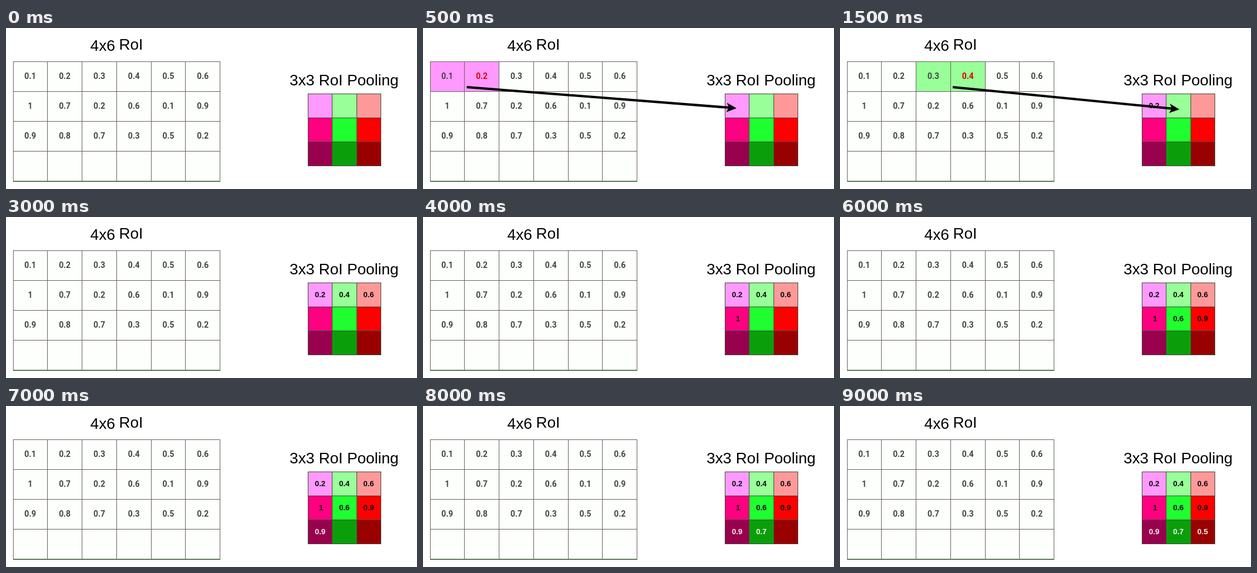
Write an HTML page that moves like this. It is 700 px wide and 275 px high and loops after 10000 ms.

```html
<!DOCTYPE html>
<html lang="en">
<head>
<meta charset="utf-8">
<title>RoI pooling</title>
<style>
  html, body { margin: 0; width: 100%; height: 100%; overflow: hidden; background: #fff; }
  svg { display: block; width: 700px; height: 275px; }
  text { font-family: "Liberation Sans", Arial, sans-serif; }
  .title { font-size: 26.3px; }
  .cell { font: bold 13.8px Roboto, sans-serif; text-anchor: middle; }
  .pooled { font-size: 13px; font-weight: bold; text-anchor: middle; }
</style>
</head>
<body>
<svg id="stage" viewBox="0 0 700 275"></svg>
<script>
const LOOP = 10000, STEP = 1000, INK = '#424642';
const values = [
  [0.1, 0.2, 0.3, 0.4, 0.5, 0.6],
  [1, 0.7, 0.2, 0.6, 0.1, 0.9],
  [0.9, 0.8, 0.7, 0.3, 0.5, 0.2],
];
const colors = [
  '#ff99ff', '#99ff99', '#ff9999',
  '#ff0080', '#1fff30', '#ff0000',
  '#99004d', '#0a9f0a', '#990000',
];
const maxInk = ['#e00000', '#e00000', '#e00000', '#fff', '#e00000', '#fff', '#fff', '#fff', '#fff'];
const tips = [
  [534, 137], [578, 139], [618, 141.5],
  [535, 179.5], [575, 183.5], [617, 183.5],
  [536, 220], [575, 219], [617, 220],
];
const stage = document.getElementById('stage');

function add(tag, attrs, content) {
  const el = document.createElementNS('http://www.w3.org/2000/svg', tag);
  for (const key in attrs) el.setAttribute(key, attrs[key]);
  if (content !== undefined) el.textContent = content;
  return stage.appendChild(el);
}

function lines(xs, ys, stroke) {
  const d = xs.map(x => `M${x} ${ys[0]}V${ys[ys.length - 1]}`)
    .concat(ys.map(y => `M${xs[0]} ${y}H${xs[xs.length - 1]}`)).join('');
  add('path', { d, stroke, fill: 'none', 'stroke-linecap': 'square' });
}

const gridX = [12.5, 70.5, 129.5, 188.5, 247.5, 305.5, 364.5];
const gridY = [57.5, 108.5, 159.5, 210.5, 261.5];
const poolX = [514.5, 555.5, 597.5, 638.5];
const poolY = [112.5, 153.5, 194.5, 235.5];

add('rect', { width: 700, height: 275, fill: '#fff' });
add('rect', { x: 12, y: 57, width: 353, height: 205, fill: '#fdfffd' });
const mark = add('rect', { height: 51 });
lines(gridX, gridY, '#6c6565');
add('path', { d: 'M12 262H365', stroke: '#3f703f', 'stroke-width': 1.5 });

const cells = values.map((row, r) => row.map((v, c) =>
  add('text', { class: 'cell', x: 41.3 + 58.8 * c, y: 87.3 + 51 * r, fill: INK }, v)));

[['4x6', 143.5, 39], ['RoI', 192.5, 37], ['3x3 RoI Pooling', 483, 98]].forEach(
  ([s, x, y]) => add('text', { class: 'title', x, y }, s));

colors.forEach((fill, k) => {
  const c = k % 3, r = Math.floor(k / 3);
  add('rect', {
    x: poolX[c], y: poolY[r], fill,
    width: poolX[c + 1] - poolX[c], height: poolY[r + 1] - poolY[r],
  });
});
lines(poolX, poolY, '#454a40');

const pooled = colors.map((_, k) => {
  const c = k % 3, r = Math.floor(k / 3);
  const v = Math.max(...values[r].slice(2 * c, 2 * c + 2));
  return add('text', {
    class: 'pooled', x: 535 + 41.3 * c + (v === 1 ? 1.5 : 0), y: 137 + 41 * r,
    fill: r === 2 ? '#f5eeee' : '#0b0b0b',
  }, v);
});

const shaft = add('path', { stroke: '#000', 'stroke-width': 4, fill: 'none' });
const head = add('path', { d: 'M0 0L-17 8L-13 0L-17 -8Z' });

function drawArrow(c, r, [x, y]) {
  const x0 = 192 + 117.5 * (c - 1), y0 = 101 + 51 * r;
  const angle = Math.atan2(y - y0, x - x0);
  shaft.setAttribute('d',
    `M${x0} ${y0}L${x - 12 * Math.cos(angle)} ${y - 12 * Math.sin(angle)}`);
  head.setAttribute('transform', `translate(${x} ${y}) rotate(${angle * 180 / Math.PI})`);
}

let shown = -1;
function render(time) {
  const beat = Math.floor(time % LOOP / (STEP / 2));
  if (beat === shown) return;
  shown = beat;
  const k = beat >> 1;
  const active = beat % 2 === 1 && k < 9;
  const c = k % 3, r = Math.floor(k / 3);

  pooled.forEach((el, i) => el.setAttribute('visibility', i < k ? 'visible' : 'hidden'));
  cells.flat().forEach(el => el.setAttribute('fill', INK));
  for (const el of [mark, shaft, head]) el.setAttribute('visibility', active ? 'visible' : 'hidden');
  if (!active) return;

  const x = gridX[2 * c], pair = values[r].slice(2 * c, 2 * c + 2);
  mark.setAttribute('x', x);
  mark.setAttribute('y', gridY[r]);
  mark.setAttribute('width', gridX[2 * c + 2] - x);
  mark.setAttribute('fill', colors[k]);
  cells[r][2 * c + pair.indexOf(Math.max(...pair))].setAttribute('fill', maxInk[k]);
  drawArrow(c, r, tips[k]);
}

const start = performance.now();
function tick() {
  render(performance.now() - start);
  requestAnimationFrame(tick);
}
tick();
</script>
</body>
</html>
```
